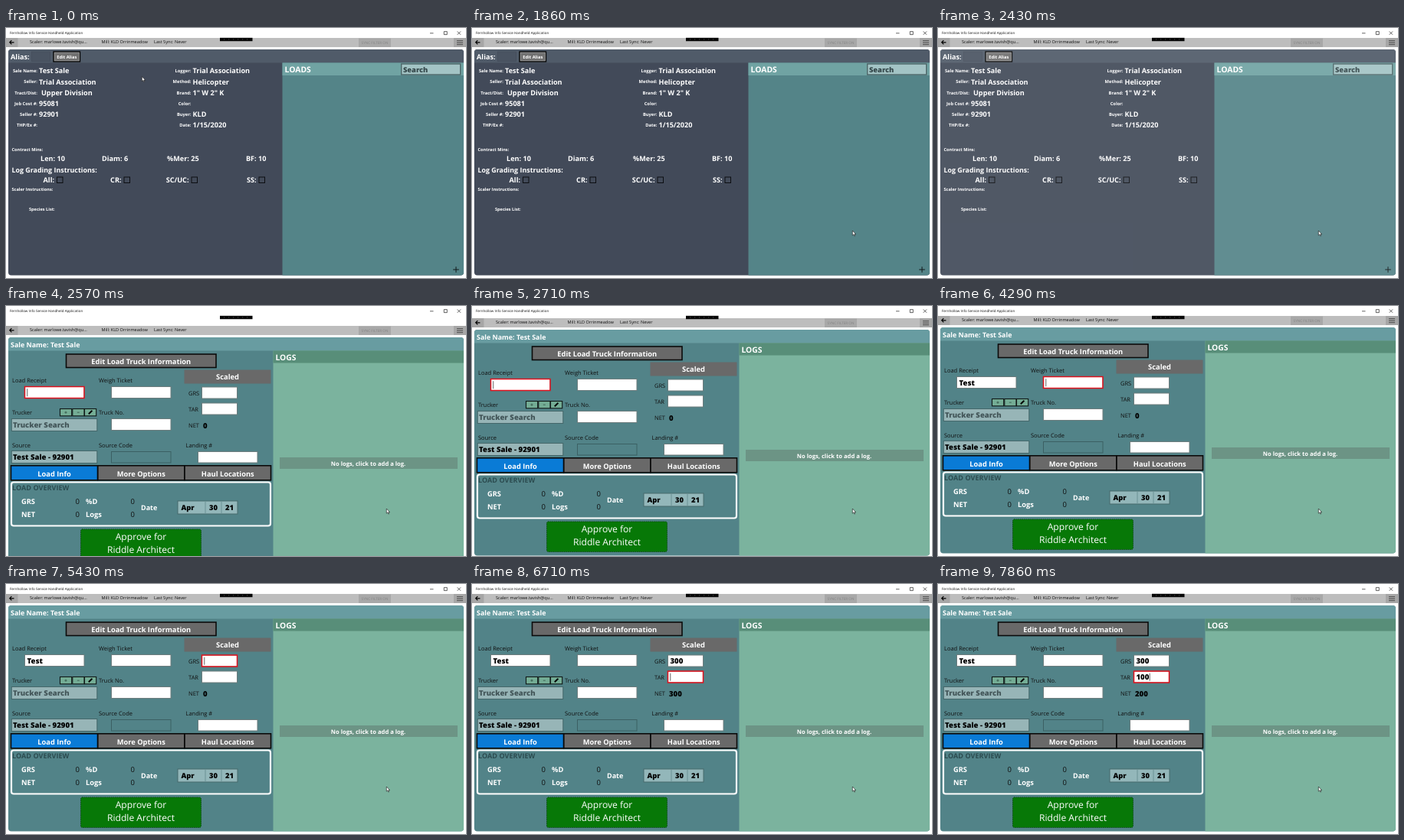
Recreate the animation shown at these times as an HTML page. Size 600x327 px, loop 8000 ms.

```html
<!DOCTYPE html>
<html lang="en">
<head>
<meta charset="utf-8">
<title>Load entry</title>
<style>
html, body { margin: 0; width: 100%; height: 100%; overflow: hidden; background: #fff; }
svg { display: block; width: 100%; height: 100%; font-family: "Open Sans", "Noto Sans", sans-serif; }
text { text-rendering: geometricPrecision; }
</style>
</head>
<body>
<svg id="stage" viewBox="0 0 600 327" preserveAspectRatio="none"></svg>
<script>
const LOOP = 8000;
const GREY = '#696969';

const esc = s => s.replace(/&/g, '&amp;').replace(/</g, '&lt;');
const rect = (x, y, w, h, fill, extra = '') =>
  `<rect x="${x}" y="${y}" width="${w}" height="${h}" fill="${fill}" ${extra}/>`;
const shape = (d, fill) => `<path d="${d}" fill="${fill}"/>`;
const path = (d, color, width = 1) =>
  `<path d="${d}" fill="none" stroke="${color}" stroke-width="${width}"/>`;
const stroke = (color, width = 1) => `stroke="${color}" stroke-width="${width}"`;

// y is the middle of the capitals
const text = (x, y, s, size, { fill = '#fff', weight = 700, anchor = 'start', id = '' } = {}) =>
  `<text x="${x}" y="${(y + size * 0.36).toFixed(2)}" font-size="${size}" font-weight="${weight}"
    fill="${fill}" text-anchor="${anchor}" ${id && `id="${id}"`}>${esc(s)}</text>`;
const mid = { anchor: 'middle' };
const plain = { fill: '#111', weight: 400 };
const heavy = { fill: '#000', weight: 800 };

// Rounded page with a header strip and a side panel starting at splitX
const page = (body, header, panel, splitX) =>
  rect(3, 28, 594, 295.5, body, 'rx="4"') +
  shape('M3 45.5V32a4 4 0 0 1 4-4H593a4 4 0 0 1 4 4V45.5z', header) +
  shape(`M${splitX} 45.5H597V319.5a4 4 0 0 1-4 4H${splitX}z`, panel);

function titleBar() {
  const dots = [284, 290, 296, 302, 308, 314].map(x => rect(x, 14.5, 1.2, 0.8, '#555')).join('');
  return text(5, 6.7, 'Fernhollow Info Service Handheld Application', 4.5, plain) +
    path('M553 6.8h4.5M571.3 4.6h4v4h-4zM588.7 4.4l4.4 4.4M593.1 4.4l-4.4 4.4', '#222', 0.7) +
    rect(279, 12.8, 42.5, 4.4, '#080808') + dots;
}

function toolBar() {
  return rect(0, 13, 600, 12, '#bdbdbd') + rect(0, 13, 15.5, 12, '#a6a6a6') +
    path('M10.5 18.8H4.8M7.4 16.2L4.8 18.8L7.4 21.4', '#000', 1.2) +
    text(31, 17.8, 'Scaler: marlowe.tavish@qu...', 5.6, plain) +
    text(124.5, 17.8, 'Mill: KLD Orrinmeadow', 5.6, plain) +
    text(193, 17.8, 'Last Sync: Never', 5.6, plain) +
    rect(460, 13.5, 42, 11.5, '#a8a8a8') +
    text(481, 19.3, 'SYNC FILTER ON', 4.6, { ...mid, fill: '#838383', weight: 400 }) +
    rect(584, 13, 16, 12, '#a6a6a6') +
    path('M588 16.7h8M588 19.2h8M588 21.7h8', '#333', 0.8);
}

function salePage() {
  const pairs = (labelX, rows) => rows.map(([label, value, dx = 0], i) => {
    const y = 56.2 + i * 14.15;
    return text(labelX, y, label + ':', 5.75, { anchor: 'end' }) + text(labelX + 2 + dx, y, value, 9.1);
  }).join('');
  const checks = [['All:', 66], ['CR:', 153.5], ['SC/UC:', 241.5], ['SS:', 329.5]].map(([s, x]) =>
    text(x - 3, 199.2, s, 9.1, { anchor: 'end' }) + rect(x + 0.5, 195, 7.5, 7.5, 'none', stroke('#0c0e12'))).join('');
  const mins = [['Len: 10', 45], ['Diam: 6', 125], ['%Mer: 25', 210], ['BF: 10', 313]]
    .map(([s, x]) => text(x, 170.6, s, 9.1)).join('');
  return page('#424a59', '#505b69', '#548488', 360.5) +
    text(6, 37.6, 'Alias:', 9.2) + rect(33.5, 31, 24, 12.5, '#4a5462', stroke('#434c5a', 0.7)) +
    rect(62, 31, 34.5, 13, '#707070', stroke('#080808', 1.4)) +
    rect(63.2, 32.2, 32.1, 10.6, 'none', stroke('#a5a5a5', 0.6)) +
    text(79.3, 37.6, 'Edit Alias', 5.7, mid) +
    pairs(41, [['Sale Name', 'Test Sale'], ['Seller', 'Trial Association'], ['Tract/Dist', 'Upper Division', 3],
      ['Job Cost #', '95081'], ['Seller #', '92901'], ['THP/Ex #', '']]) +
    pairs(241.5, [['Logger', 'Trial Association'], ['Method', 'Helicopter'], ['Brand', '1" W 2" K'],
      ['Color', ''], ['Buyer', 'KLD'], ['Date', '1/15/2020']]) +
    text(7.5, 158.8, 'Contract Mins:', 5.6) + mins +
    text(7.5, 185.3, 'Log Grading Instructions:', 8.9) + checks +
    text(7.5, 211, 'Scaler Instructions:', 5.6) + text(30, 237, 'Species List:', 5.6) +
    rect(360.5, 45.5, 236.5, 16.5, '#70a3a3') + text(363.5, 54.5, 'LOADS', 10.4) +
    rect(515.7, 47, 77, 14, '#a3c4c5', stroke('#4d6668', 1.4)) +
    text(518, 54.6, 'Search', 9.3, { fill: '#34474a', weight: 800 }) +
    path('M583.2 316h7.6M587 312.2v7.6', '#10191a', 1);
}

const fields = {
  load: [24.5, 92.5, 77.5, 15], weigh: [137.5, 92.5, 77.5, 15], truck: [137.5, 134.5, 77.5, 15],
  landing: [250.5, 177.5, 77.5, 14.5], grs: [255.5, 93, 46, 15], tar: [255.5, 114, 46, 15]
};

function loadPage() {
  const button = (x, y, w, h, s, fill = GREY) =>
    rect(x, y, w, h, fill, stroke('#0a0a0a', 1.6)) + text(x + w / 2, y + h / 2 + 0.9, s, 9.3, mid);
  const inputs = Object.entries(fields).map(([id, [x, y, w, h]]) =>
    rect(x, y, w, h, '#fff', stroke('#6d7c7d')) +
    text(x + 3, y + h / 2 + 0.5, '', 9.6, { ...heavy, id: 'val-' + id })).join('');
  const labels = [[8, 84, 'Load Receipt'], [121, 84, 'Weigh Ticket'], [8, 126, 'Trucker'], [121, 126, 'Truck No.'],
    [8, 168.8, 'Source'], [121, 168.8, 'Source Code'], [234.5, 168.8, 'Landing #'],
    [238, 101, 'GRS'], [238, 122, 'TAR'], [238, 143.3, 'NET']]
    .map(([x, y, s]) => text(x, y + 0.3, s, 7.5, plain)).join('');
  const icons = [70.5, 86.8, 102.5].map(x => rect(x, 121.5, 15.2, 9.3, '#74ad95', stroke('#101816', 1.1))).join('') +
    path('M76.4 126.2h3.2M78 124.6v3.2M92.8 126.2h3', '#315446', 0.8) +
    path('M107.8 128.2L112.4 123.8', '#000', 1.9);
  const totals = [[20, 96, 242.3, 'GRS'], [104, 168, 242.3, '%D'], [20, 96, 260, 'NET'], [104, 168, 260, 'Logs']]
    .map(([x, end, y, s]) => text(x, y, s, 9.3) + text(end, y, '0', 9.5, { ...plain, anchor: 'end' })).join('');
  const dark = '#45676a';
  return page('#528388', '#689ca1', '#7bb39e', 348.5) +
    text(6, 37.6, 'Sale Name: Test Sale', 8.9) +
    rect(348.5, 45.5, 248.5, 16, '#588e79') + text(351.5, 54.3, 'LOGS', 10.3) +
    rect(357, 185, 232, 15, '#6c9485') + text(472.5, 193.3, 'No logs, click to add a log.', 7.6, mid) +
    button(78.5, 50, 195.5, 17.5, 'Edit Load Truck Information') +
    rect(232.5, 70.5, 113, 18, GREY) + text(289, 79.8, 'Scaled', 9.4, mid) +
    labels + icons + inputs +
    text(257, 143.4, '0', 9.6, { ...heavy, id: 'net' }) +
    rect(7.3, 134.5, 111.5, 16, '#97b5b7', stroke(dark)) +
    text(9, 142.4, 'Trucker Search', 9.6, { fill: '#435659', weight: 800 }) +
    rect(7.3, 176.5, 111.5, 16, '#97b5b7', stroke(dark)) + text(9, 184.1, 'Test Sale - 92901', 9.6, heavy) +
    rect(137.5, 177.5, 77.5, 14.5, 'none', stroke('#3b6063')) +
    button(6.5, 195.8, 113, 19, 'Load Info', '#0a7bd6') +
    button(119.8, 195.8, 113, 19, 'More Options') + button(233, 195.8, 112.5, 19, 'Haul Locations') +
    rect(7, 217.5, 338, 57, 'none', `rx="3" ${stroke('#fff', 2.2)}`) +
    text(8, 225, 'LOAD OVERVIEW', 9.1, { fill: '#2c4c50' }) + totals + text(176, 251, 'Date', 9) +
    rect(224, 242, 78, 17, '#93b7ba', stroke('#476a6d')) + path('M260 242v17M281 242v17', '#6b9194') +
    text(228.5, 251, 'Apr', 9.4, heavy) + text(270.5, 251, '30', 9.4, { ...heavy, ...mid }) +
    text(291.5, 251, '21', 9.4, { ...heavy, ...mid }) +
    rect(97.5, 279, 157, 39.5, '#077807', `rx="2" ${stroke('#0d4d17', 1)} stroke-dasharray="1.5 1"`) +
    text(176, 288.7, 'Approve for', 12.1, { ...mid, weight: 400 }) +
    text(176, 305.8, 'Riddle Architect', 12.1, { ...mid, weight: 400 }) +
    rect(0, 0, 0, 0, 'none', `id="ring" ${stroke('#e0101c', 1.5)}`) +
    rect(0, 0, 0.7, 10, '#222', 'id="caret"') +
    `<g id="clear">${path('M93.7 98.5l3.6 3.6M97.3 98.5l-3.6 3.6', '#777', 0.7)}</g>`;
}

const stage = document.getElementById('stage');
stage.innerHTML = `<g id="body">${toolBar()}<g id="sale">${salePage()}</g><g id="entry">${loadPage()}</g></g>
  ${titleBar()}
  <path id="pointer" d="M0 0V6.2L1.5 4.9L2.5 7.1L3.4 6.7L2.5 4.6H4.3Z" fill="#fff" stroke="#111" stroke-width=".6"/>`;
const $ = id => document.getElementById(id);
const set = (el, attrs) => Object.entries(attrs).forEach(([k, v]) => el.setAttribute(k, v));
const show = (el, on) => el.setAttribute('visibility', on ? 'visible' : 'hidden');

const pointerSteps = [[0, 177.3, 63.5], [140, 290, 108], [290, 455, 178], [430, 514, 204],
  [710, 512, 224], [860, 507, 250], [1000, 499, 268], [1140, 496.3, 265]];
const slideSteps = [[0, 0], [2570, 13], [2710, 3], [2860, 0.8], [3000, 0]];
const inputSteps = [[2570, 'load', ''], [3290, 'load', 'T'], [3430, 'load', 'Te'], [3570, 'load', 'Tes'],
  [3860, 'load', 'Test'], [4140, 'weigh', ''], [4430, 'grs', ''], [5710, 'grs', '3'], [6000, 'grs', '30'],
  [6290, 'grs', '300'], [6710, 'tar', ''], [7430, 'tar', '1'], [7710, 'tar', '10'], [7860, 'tar', '100']];
const latest = (steps, t) => steps.filter(s => s[0] <= t).pop();

function draw(t) {
  const onEntry = t >= 2570;
  const [, px, py] = latest(pointerSteps, t);
  set($('pointer'), { transform: `translate(${px} ${py})` });
  set($('body'), { transform: `translate(0 ${latest(slideSteps, t)[1]})` });
  set($('sale'), { display: onEntry ? 'none' : 'inline', opacity: t < 2430 ? 1 : 0.92 });
  set($('entry'), { display: onEntry ? 'inline' : 'none' });
  if (!onEntry) return;

  const values = {};
  for (const [at, id, value] of inputSteps) if (at <= t) values[id] = value;
  for (const id in fields) $('val-' + id).textContent = values[id] || '';
  $('net').textContent = (values.grs || 0) - (values.tar || 0);

  const [since, id, value] = latest(inputSteps, t);
  const [x, y, w, h] = fields[id];
  set($('ring'), { x, y, width: w, height: h });
  set($('caret'), { x: x + 3 + (value ? $('val-' + id).getComputedTextLength() + 0.4 : 0), y: y + 2.7 });
  show($('caret'), Math.floor((t - since) / 500) % 2 === 0);
  show($('clear'), id === 'load' && value);
}

const start = performance.now();
function tick() {
  draw((performance.now() - start) % LOOP);
  requestAnimationFrame(tick);
}
tick();
</script>
</body>
</html>
```
